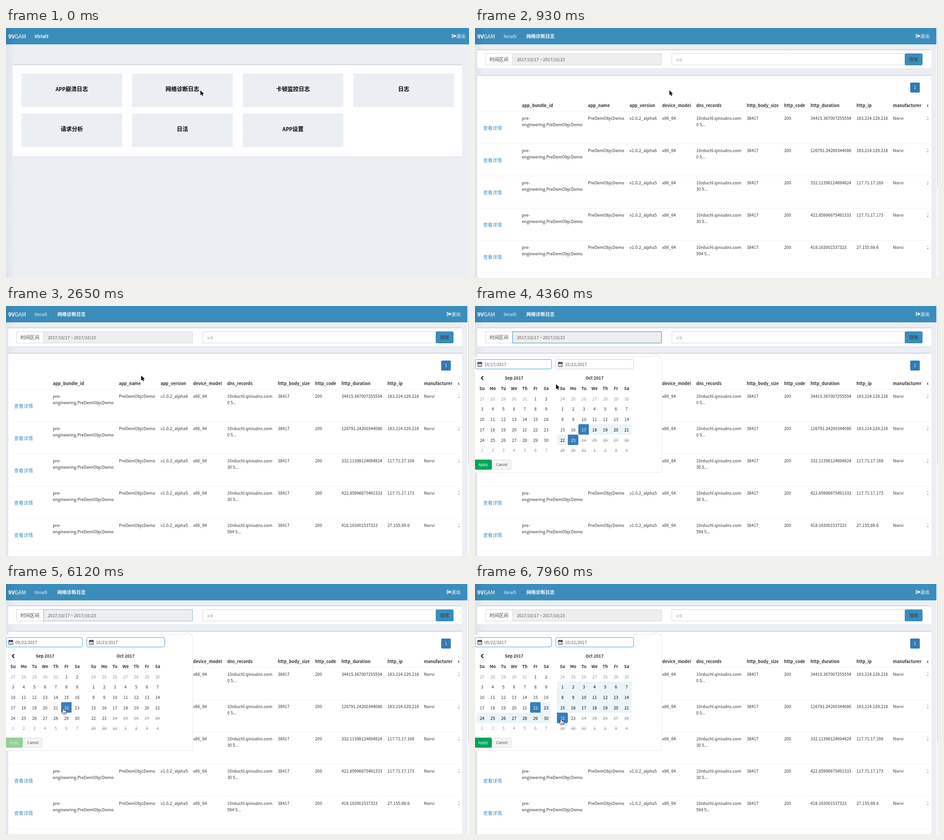
Animation of 1017x550 px, one loop 8 s. Source, as an HTML page with a canvas:

```html
<!DOCTYPE html>
<html lang="zh">
<head>
<meta charset="utf-8">
<title>网络诊断日志</title>
<style>
html, body { margin: 0; width: 100%; height: 100%; overflow: hidden; background: #ebeff4; }
canvas { display: block; }
</style>
</head>
<body>
<canvas id="stage" width="1017" height="550"></canvas>
<script>
const LOOP = 8000, BLUE = '#3c8dbc', GREY = '#d2d6de';
const ctx = document.getElementById('stage').getContext('2d');

// ---------- helpers ----------
function box(x, y, w, h, fill, border, r = 0) {
  const i = border ? 0.5 : 0;
  ctx.beginPath();
  ctx.roundRect(x + i, y + i, w - 2 * i, h - 2 * i, r);
  if (fill) { ctx.fillStyle = fill; ctx.fill(); }
  if (border) { ctx.lineWidth = 1; ctx.strokeStyle = border; ctx.stroke(); }
}

function line(points, color, width = 1) {
  ctx.beginPath();
  points.forEach(([x, y]) => ctx.lineTo(x, y));
  ctx.lineWidth = width;
  ctx.strokeStyle = color;
  ctx.stroke();
}

function poly(points, fill) {
  ctx.beginPath();
  points.forEach(([x, y]) => ctx.lineTo(x, y));
  ctx.closePath();
  ctx.fillStyle = fill;
  ctx.fill();
}

// Latin runs are set slightly smaller than Chinese runs; y is the middle of the line.
function text(s, x, y, { size = 10.3, color = '#333', bold = false, center = false } = {}) {
  const runs = s.split(/([\u2e80-\uffff]+)/).filter(Boolean).map(str => {
    const px = /[\u2e80-\uffff]/.test(str) ? size : size * 0.895;
    const font = `${bold ? 700 : 400} ${px}px "Noto Sans CJK SC", "Noto Sans CJK", sans-serif`;
    ctx.font = font;
    return { str, font, w: ctx.measureText(str).width };
  });
  const width = runs.reduce((sum, r) => sum + r.w, 0);
  if (center) x -= width / 2;
  ctx.fillStyle = color;
  for (const r of runs) {
    ctx.font = r.font;
    ctx.fillText(r.str, x, y + size * 0.35);
    x += r.w;
  }
  return width;
}

function leftShade(height, alpha) {
  const g = ctx.createLinearGradient(0, 0, 20, 0);
  g.addColorStop(0, `rgba(20,40,80,${alpha})`);
  g.addColorStop(1, 'rgba(20,40,80,0)');
  ctx.fillStyle = g;
  ctx.fillRect(0, 0, 20, height);
}

function panel(x, y, right, bottom) {
  box(x, y + 1, right - x, bottom - y, '#d9dde3', null, 2);
  box(x, y, right - x, bottom - y, '#fff', null, 2);
  box(x, y, right - x, 2, GREY, null, 1);
}

// ---------- page ----------
function header(right, crumb) {
  box(0, 0, right, 36, BLUE);
  leftShade(36, 0.12);
  const color = '#fff';
  const w = text('9V', 5, 18, { size: 13.2, color, bold: true });
  text('GAM', 5 + w, 18, { size: 13.2, color });
  text('litrial5', 63, 18, { color, bold: !crumb });
  if (crumb) {
    text('>', 102, 18, { size: 9.5, color: '#2b6688' });
    text(crumb, 113, 18, { color, bold: true });
  }
  const x = right < 1017 ? 968 : 979;
  line([[x + 4, 13.8], [x + 1, 13.8], [x + 1, 21.2], [x + 4, 21.2]], color, 1.3);
  box(x + 3, 16, 4, 3, color);
  poly([[x + 6, 13.7], [x + 10, 17.5], [x + 6, 21.3]], color);
  text('退出', x + 10, 18, { color });
}

function home() {
  header(1017);
  panel(15, 80, 1002, 283);
  ['APP崩溃日志', '网络诊断日志', '卡顿监控日志', '日志', '请求分析', '日活', 'APP设置'].forEach((s, i) => {
    const x = 34 + (i % 4) * 243, y = i < 4 ? 100 : 188;
    box(x, y, 221, 74, '#ebeff3', null, 2);
    text(s, x + 110.5, y + 34.5, { size: 12.3, color: '#000', bold: true, center: true });
  });
}

function searchBar(right, dateRight, queryLeft, button, dateBorder) {
  panel(5, 47, right, 89);
  box(23, 56, 61, 26, '#fff', GREY);
  text('时间区间', 32, 69, { color: '#444' });
  box(82, 56, dateRight - 82, 26, '#eee', dateBorder);
  text('2017/10/17 ~ 2017/10/23', 92, 69, { color: '#555' });
  box(queryLeft, 56, button - queryLeft + 1, 26, '#fff', GREY);
  text('a:b', queryLeft + 9.5, 69, { color: '#999' });
  box(button, 56, 39, 26, BLUE, '#367fa9', 2);
  text('搜索', button + 19.5, 69, { color: '#333f48', center: true });
}

function loading(angle) {
  searchBar(1013, 415, 437, 955, GREY);
  panel(5, 103, 1013, 160);
  text('无数据', 509, 143, { size: 8.8, bold: true, center: true });
  ctx.save();
  ctx.translate(507.5, 132);
  ctx.rotate(angle);
  for (let i = 0; i < 2; i++) {
    ctx.beginPath();
    ctx.arc(0, 0, 8, -2.4, 0);
    ctx.lineWidth = 3.2;
    ctx.strokeStyle = '#000';
    ctx.stroke();
    poly([[3.5, 0], [12.3, 0], [8, 6]], '#000');
    ctx.rotate(Math.PI);
  }
  ctx.restore();
}

// Each column: left edge, heading, and the cell text of a record.
const COLUMNS = [
  [103, 'app_bundle_id', () => 'pre-\nengineering.PreDemObjcDemo'],
  [248, 'app_name', () => 'PreDemObjcDemo'],
  [339.5, 'app_version', r => 'v1.0.2_' + r.version],
  [411, 'device_model', () => 'x86_64'],
  [486, 'dns_records', r => `10rduchl.qiniudns.com\n${r.dns} 5...`],
  [597, 'http_body_size', () => '38417'],
  [679, 'http_code', () => '200'],
  [737, 'http_duration', r => r.duration],
  [838, 'http_ip', r => r.ip],
  [918, 'manufacturer', () => 'Norvi'],
  [993, 'd', () => '2']
];
const RECORDS = [
  { version: 'alpha6', dns: '0', duration: '34415.367007255554', ip: '183.214.129.218' },
  { version: 'alpha6', dns: '0', duration: '126791.24200344086', ip: '183.214.129.218' },
  { version: 'alpha5', dns: '30', duration: '332.11398124694824', ip: '117.71.17.169' },
  { version: 'alpha5', dns: '30', duration: '422.85996675491333', ip: '117.71.17.173' },
  { version: 'alpha5', dns: '594', duration: '418.163001537323', ip: '27.155.69.6' }
];

function results(dateBorder, pointerY) {
  searchBar(1002, 410, 432, 944, dateBorder);
  panel(5, 103, 1002, 600);
  box(956, 120, 21, 22, '#337ab7', null, 2);
  text('1', 966.5, 131, { color: '#fff', center: true, size: 9.6 });
  ctx.save();
  ctx.beginPath();
  ctx.rect(12, 100, 983.5, 500);
  ctx.clip();
  for (const [x, name] of COLUMNS) text(name, x, 170, { bold: true });
  RECORDS.forEach((record, i) => {
    const y = 184 + 71 * i;
    if (pointerY > y && pointerY < y + 71) box(12, y, 984, 71, '#f3f3f3');
    box(12, y - 1, 984, 1, '#f1f1f1');
    text('查看详情', 18, y + 36, { color: BLUE });
    for (const [x, , cell] of COLUMNS)
      cell(record).split('\n').forEach((s, n) => text(s, x, y + 14 + 14.8 * n));
  });
  box(12, 538, 984, 1, '#f1f1f1');
  ctx.restore();
}

// ---------- date picker ----------
const day = (m, d) => Date.UTC(2017, m - 1, d) / 864e5;
const format = n => {
  const [y, m, d] = new Date(n * 864e5).toISOString().slice(0, 10).split('-');
  return `${m}/${d}/${y}`;
};
const CELL_W = 23.45, CELL_H = 22.75, CELL_Y = 192.2, LAST_DAY = day(10, 23);
const MONTHS = [
  { x: 3.8, first: day(8, 27), month: 9, name: 'Sep 2017' },
  { x: 180.6, first: day(9, 24), month: 10, name: 'Oct 2017' }
];

function dayAt(x, y) {
  for (const m of MONTHS) {
    const col = Math.floor((x - m.x) / CELL_W), row = Math.floor((y - CELL_Y) / CELL_H);
    if (col < 0 || col > 6 || row < 0 || row > 5) continue;
    const n = m.first + row * 7 + col;
    return n <= LAST_DAY ? { n, m } : null;
  }
  return null;
}

function dateInput(x, right, value, active) {
  box(x, 117, right - x, 22, '#fff', active ? '#3fa0d2' : '#ccc', 3);
  const ix = x + 5.5;
  box(ix, 124, 10, 10, null, '#333', 1);
  box(ix, 124, 10, 3, '#333');
  for (const k of [2, 6.4]) box(ix + k, 122.5, 1.6, 3, '#333');
  for (const k of [3.2, 6.2]) box(ix + k, 127, 0.7, 6, '#777');
  box(ix + 1, 129.8, 8, 0.7, '#777');
  text(value, x + 20.5, 128, { color: '#555' });
}

function month(m, start, end, rangeEnd, hover) {
  text(m.name, m.x + CELL_W * 3.5, 158, { bold: true, center: true });
  ['Su', 'Mo', 'Tu', 'We', 'Th', 'Fr', 'Sa'].forEach((s, i) =>
    text(s, m.x + CELL_W * (i + 0.5), 181, { bold: true, center: true }));
  for (let i = 0; i < 42; i++) {
    const n = m.first + i, date = new Date(n * 864e5);
    const x = m.x + (i % 7) * CELL_W, y = CELL_Y + Math.floor(i / 7) * CELL_H;
    const left = Math.floor(x), top = Math.round(y);
    const own = date.getUTCMonth() + 1 === m.month;
    const active = own && (n === start || n === end);
    const hovered = hover && hover.m === m && hover.n === n;
    const inRange = own && n > start && n <= rangeEnd;
    const disabled = n > LAST_DAY && m.month === 10;
    const fill = active ? '#357ebd' : hovered ? '#eee' : inRange ? '#ebf4f8' : null;
    const r = active ? (n === start ? [3, 0, 0, 3] : [0, 3, 3, 0]) : 0;
    if (fill) box(left, top, Math.floor(x + CELL_W) - left, Math.round(y + CELL_H) - top, fill, null, r);
    const color = active ? '#fff' : !own || disabled ? '#999' : inRange ? '#000' : '#333';
    const cx = x + CELL_W / 2, cy = y + CELL_H / 2 + 0.5;
    const w = text(String(date.getUTCDate()), cx, cy, { color, center: true });
    if (disabled) box(cx - w / 2, cy + 0.2, w, 0.9, '#999');
  }
}

function picker(t, hover) {
  const picking = t >= 6120 && t < 7960;
  const start = t < 6120 ? day(10, 17) : day(9, 22);
  const end = t < 6120 ? LAST_DAY : picking ? null : day(10, 22);
  const rangeEnd = picking ? (hover ? hover.n : start) : end;
  const startShown = t >= 4840 && t < 6120 && hover ? hover.n : start;
  const endShown = picking ? (t >= 6500 && hover ? hover.n : LAST_DAY) : end;

  box(-10, 111, 420.5, 256, '#fff', '#e6e8ea', 3);
  poly([[391, 112], [398, 106], [405, 112]], '#fff');
  line([[391, 111.5], [398, 106.5], [405, 111.5]], '#d5d8dc');
  dateInput(0, 168.5, format(startShown), t < 6240 || t >= 7960);
  dateInput(177, 349, format(endShown), t >= 6120);
  line([[18, 154.2], [14, 158.5], [18, 162.8]], '#222', 2.2);
  MONTHS.forEach(m => month(m, start, end, rangeEnd, hover));

  box(-1, 338, 38, 22, picking ? '#93d094' : '#00a65a', picking ? '#8bc98d' : '#00964f', 2);
  text('Apply', 18, 349, { size: 8.85, color: picking ? '#d8efd8' : '#fff', center: true });
  box(39, 338, 41, 22, '#f4f4f4', '#ddd', 2);
  text('Cancel', 59, 349, { size: 8.85, color: '#444', center: true });
}

// ---------- pointer ----------
// Each stroke of the mouse: start, end, and where it arrives. It advances once per TICK.
const TICK = 118;
const STROKES = [
  [1280, 1640, 292, 217], [2300, 2300, 266, 195], [2540, 2650, 297, 153], [2920, 2920, 231, 81],
  [3150, 3150, 207, 69], [4010, 4360, 178, 172], [4480, 4720, 130, 279], [4840, 5420, 145, 275],
  [5530, 5770, 126, 274], [6500, 6860, 215, 295], [7010, 7360, 189, 297.5]
];

function pointerAt(t) {
  let x = 427, y = 137;
  for (const [from, to, tx, ty] of STROKES) {
    if (t < from) break;
    const steps = Math.round((to - from) / TICK) + 1;
    const p = Math.min(1, Math.floor((t - from) / TICK + 1.1) / steps);
    x += (tx - x) * p;
    y += (ty - y) * p;
  }
  return [x, y];
}

function arrow(x, y) {
  ctx.save();
  ctx.translate(x, y);
  const shape = new Path2D('M0 0V11L2.5 8.7L4.2 12.6L6 11.8L4.4 8H7.8Z');
  ctx.lineWidth = 1.6;
  ctx.strokeStyle = '#fff';
  ctx.stroke(shape);
  ctx.fillStyle = '#000';
  ctx.fill(shape);
  ctx.restore();
}

function hand(x, y) {
  ctx.beginPath();
  ctx.roundRect(x - 1, y + 0.5, 2.4, 9, 1.2);
  ctx.roundRect(x - 1, y + 4.5, 7.4, 7.5, 2.5);
  ctx.roundRect(x - 3.4, y + 6.2, 4, 3, 1.4);
  ctx.lineWidth = 1.6;
  ctx.strokeStyle = '#000';
  ctx.stroke();
  ctx.fillStyle = '#fff';
  ctx.fill();
  for (let i = 0; i < 3; i++) box(x + 0.4 + 1.9 * i, y + 7.6, 0.8, 2.6, '#000');
}

// ---------- timeline ----------
function draw(t) {
  const [px, py] = pointerAt(t);
  const scroll = t < 1880 || t >= 2540 ? 0 : t < 2030 ? 3 : 5;
  const open = t >= 3630;
  const hover = open ? dayAt(px, py) : null;

  box(0, 0, 1017, 550, '#ebeff4');
  leftShade(550, 0.055);
  ctx.save();
  ctx.translate(0, -scroll);
  if (t < 510) {
    home();
  } else if (t < 930) {
    header(1017, '网络诊断日志');
    loading(t < 750 ? -0.75 : 0);
  } else {
    const focused = open && t < 6240, fading = t < 3740 || t >= 6120;
    header(1014, '网络诊断日志');
    results(!focused ? GREY : fading ? '#88b4d0' : BLUE, open ? 0 : py + scroll);
  }
  ctx.restore();
  if (t >= 930) {
    box(1013.5, 0, 3.5, 550, '#f8f9fa');
    box(1016, 2 + scroll / 2, 4, 347, '#c1c1c1', null, 1);
  }
  if (open) picker(t, hover);
  (hover ? hand : arrow)(px, py);
}

function tick() {
  draw(performance.now() % LOOP);
  requestAnimationFrame(tick);
}
tick();
</script>
</body>
</html>
```
